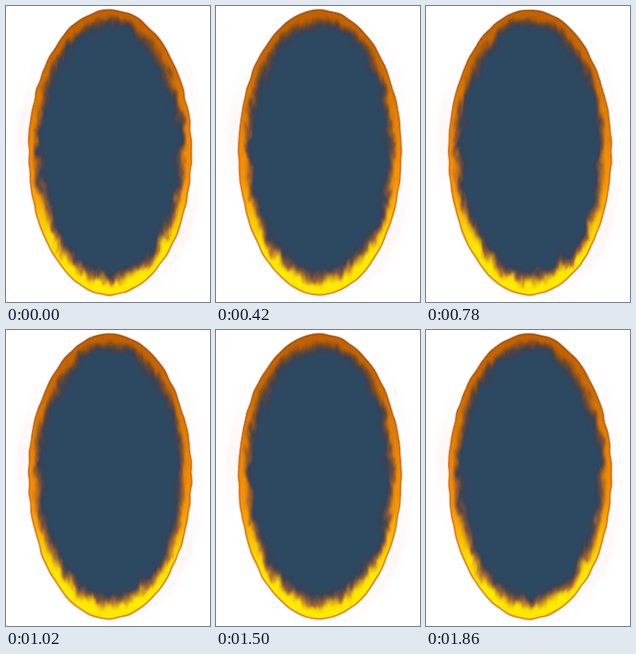
Write an HTML page with a canvas that moves like this. It is 256 px wide and 371 px high and loops after 1.92 s.

```html
<!DOCTYPE html>
<html>
<head>
<meta charset="utf-8">
<title>Fire portal</title>
<style>
  html, body { margin: 0; width: 100%; height: 100%; overflow: hidden; background: #fff; }
  canvas { display: block; }
</style>
</head>
<body>
<canvas id="stage" width="256" height="371"></canvas>
<script>
const W = 256, H = 371, CX = 130.5, CY = 183.5, RX = 102, RY = 178.5;
const STEP = 60, HALF = 16;
const ctx = document.getElementById('stage').getContext('2d');
const img = ctx.createImageData(W, H);

const WHITE = [255, 255, 255], VOID = [45, 73, 98], SMOKE = [66, 58, 72];

const clamp = v => Math.max(0, Math.min(1, v));
const smooth = (a, b, v) => { const t = clamp((v - a) / (b - a)); return t * t * (3 - 2 * t); };
const lerp = (a, b, t) => a + (b - a) * t;
const mix = (a, b, t) => [lerp(a[0], b[0], t), lerp(a[1], b[1], t), lerp(a[2], b[2], t)];
const bump = (v, mid, width) => Math.exp(-(((v - mid) / width) ** 2));

function hash(x, y, z) {
  let h = Math.imul(x, 374761393) ^ Math.imul(y, 668265263) ^ Math.imul(z, 1274126177);
  h = Math.imul(h ^ (h >>> 13), 1103515245);
  h = Math.imul(h ^ (h >>> 15), 2246822519);
  return ((h ^ (h >>> 16)) >>> 0) / 4294967296;
}

// Smooth 3D value noise in 0..1
function noise(x, y, z) {
  const i = Math.floor(x), j = Math.floor(y), k = Math.floor(z);
  const u = smooth(0, 1, x - i), v = smooth(0, 1, y - j), w = smooth(0, 1, z - k);
  const row = (b, c) => lerp(hash(i, b, c), hash(i + 1, b, c), u);
  const layer = c => lerp(row(j, c), row(j + 1, c), v);
  return lerp(layer(k), layer(k + 1), w);
}

// Rising flames: bent, vertically stretched noise
function flames(x, y, p) {
  const rise = y + 3 * p;
  const bend = 10 * (noise(x / 20, rise / 20, 40 + p * .15) - .5);
  return .5 * noise((x + bend) / 13, rise / 24, p * .22)
       + .35 * noise((x + bend) / 6, rise / 14, 10 + p * .3)
       + .15 * noise((x - bend) / 3, rise / 8, 20 + p * .4);
}

// Hottest colour at each height: dark orange above, yellow below
function hotColor(ny) {
  const warm = mix([194, 98, 2], [246, 146, 0], smooth(-1, .25, ny));
  return mix(warm, [255, 234, 0], smooth(.1, .75, ny));
}

// Cooler tips of the flames
function tipColor(ny) {
  return mix([150, 78, 14], [206, 112, 36], smooth(-1, .6, ny));
}

function rimColor(ny) {
  return mix([150, 70, 12], [206, 92, 24], smooth(-1, 0, ny));
}

function outside(d, x, y, ny) {
  const haze = bump(d, -9, 8) * .055 *
    (x < CX ? bump(y, 155, 55) : bump(y, 285, 60) + .4 * bump(y, 110, 60));
  const back = mix(WHITE, [255, 90, 80], haze);
  return mix(back, rimColor(ny), .8 * smooth(-1.8, .2, d));
}

function inside(d, x, y, ny, p) {
  const depth = ny > 0 ? 15 + 20 * ny ** 3 : 15 + 4 * ny * ny;
  if (d > depth * 2.2) return VOID;
  const n = clamp((flames(x, y, p) - .5) * 1.6 + .5);
  const s = d / (depth * (.62 + .7 * n));
  const glow = mix(hotColor(ny), tipColor(ny), smooth(.2, .85, s + .3 * (.5 - n)));
  const back = mix(VOID, SMOKE, .6 * smooth(1.6, .8, s));
  const fire = mix(back, glow, smooth(1.2, .35, s));
  return mix(fire, rimColor(ny), .7 * smooth(2.4, 0, d));
}

function draw(p) {
  for (let y = 0, i = 0; y < H; y++) {
    for (let x = 0; x < W; x++, i += 4) {
      const dx = x + .5 - CX, dy = y + .5 - CY, ny = dy / RY;
      const f = Math.hypot(dx / RX, ny);
      const slope = Math.hypot(dx / RX ** 2, dy / RY ** 2) || 1;
      let d = f < .3 ? 99 : (1 - f) * f / slope;
      if (Math.abs(d) < 40) d += 2 * (noise(x / 13, (y + 2 * p) / 13, 50 + p * .2) - .5);
      const c = d < 0 ? outside(d, x, y, ny) : inside(d, x, y, ny, p);
      img.data[i] = c[0];
      img.data[i + 1] = c[1];
      img.data[i + 2] = c[2];
      img.data[i + 3] = 255;
    }
  }
  ctx.putImageData(img, 0, 0);
}

// The fire runs forward for half the loop, then back again
let shown = -1;
function tick() {
  const k = Math.floor(performance.now() / STEP) % (2 * HALF);
  const pose = HALF - Math.abs(HALF - k);
  if (pose !== shown) draw(shown = pose);
  requestAnimationFrame(tick);
}
tick();
</script>
</body>
</html>
```
